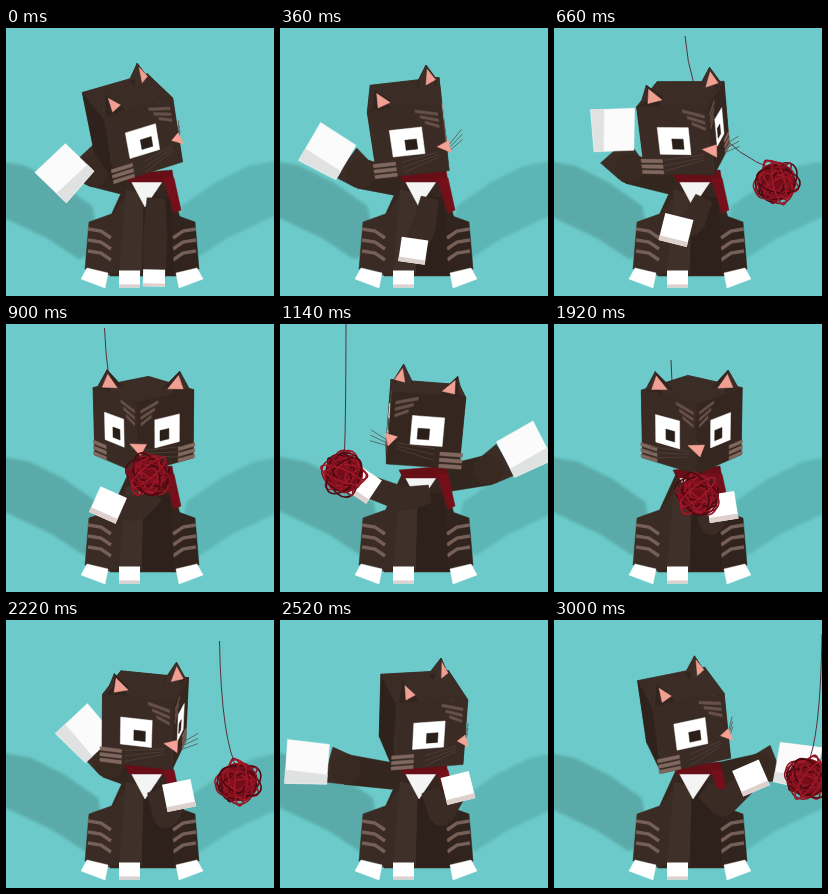
These frames come from a looping animation (268x268 px, 3060 ms). An HTML page:

```html
<!DOCTYPE html>
<html lang="en">
<head>
<meta charset="utf-8">
<title>Cat and yarn</title>
<style>
html, body { margin: 0; height: 100%; overflow: hidden; background: #6ccbca; }
svg { display: block; width: 100vw; height: 100vh; }
</style>
</head>
<body>
<svg id="stage" viewBox="0 0 268 268"></svg>
<script>
const LOOP = 3060, STEP = 60, MIDDLE = 136;
const HALF = 50, TALL = 71; // half diagonal and height of the head
const stage = document.getElementById('stage');
const rad = deg => deg * Math.PI / 180;
const mix = (a, b, p) => a + (b - a) * p;

// Every track holds one value per beat and eases between them.
const BEATS = [0, 660, 1140, 1440, 1920, 2520, 3000];
const YARN_BEATS = [540, ...BEATS.slice(1)];

function track(values, beats = BEATS) {
  return t => {
    let i = 0;
    while (i < beats.length - 2 && t > beats[i + 1]) i++;
    const p = Math.min(1, Math.max(0, (t - beats[i]) / (beats[i + 1] - beats[i])));
    return mix(values[i], values[i + 1], p * p * (3 - 2 * p));
  };
}
const gaze = track([60, 28, -41, -28, 5, 60, 56]);
const lean = track([-10, -6, 5, 4, 0, 3, -7]);
const tailSwing = track([-.72, -.87, .93, .05, 0, -1, .9]);
const tailAngle = track([226, 92, 27, 90, 90, 176, -10]);
const pawX = track([148, 122, 82, 122, 168, 178, 197]);
const pawY = track([250, 202, 160, 166, 183, 168, 158]);
const yarnX = track([320, 222, 64, 73, 144, 320, 253], YARN_BEATS);
const anchorX = track([320, 131, 66, 57, 117, 310, 268], YARN_BEATS);
const slack = track([10, 8, 0, 0, 36, 6, 14], YARN_BEATS);

const path = pts => 'M' + pts.map(p => p.map(v => v.toFixed(1)).join()).join('L');
const poly = (pts, fill) =>
  `<path d="${path(pts)}Z" fill="${fill}" stroke="${fill}" stroke-width=".5"/>`;
const line = (pts, color, width) =>
  `<path d="${path(pts)}" fill="none" stroke="${color}" stroke-width="${width}"/>`;
const dot = (x, y, r, fill) => `<circle cx="${x}" cy="${y}" r="${r}" fill="${fill}"/>`;
const mirror = (s, pts, shift = 0) => pts.map(([x, y]) => [MIDDLE + s * x + shift, y]);

// Tapered block along the segment a-b.
function limb(a, b, wa, wb, fill) {
  const dx = b[0] - a[0], dy = b[1] - a[1], len = Math.hypot(dx, dy) || 1;
  const nx = -dy / len / 2, ny = dx / len / 2;
  return poly([[a[0] + nx * wa, a[1] + ny * wa], [b[0] + nx * wb, b[1] + ny * wb],
    [b[0] - nx * wb, b[1] - ny * wb], [a[0] - nx * wa, a[1] - ny * wa]], fill);
}

function shadows(t) {
  const shape = [[145, 132], [112, 138], [78, 155], [45, 178], [36, 222],
    [58, 231], [90, 210], [145, 184]];
  return '<g filter="url(#soft)">' +
    poly(mirror(1, shape, lean(t) / 2), '#5cb6b5') +
    poly(mirror(-1, shape, lean(t) / 2), '#5aaaa9') + '</g>';
}

function tail(t) {
  const a = rad(tailAngle(t)), cos = Math.cos(a), sin = Math.sin(a);
  const root = [140, 160];
  const base = [140 + 92 * tailSwing(t), 146 - 23 * Math.abs(sin)];
  const knee = [mix(base[0], root[0], .2), mix(base[1], 153, .6)];
  const end = [base[0] + 42 * cos, base[1] - 42 * sin];
  const under = cos < 0 ? -1 : 1;
  const edge = ([x, y]) => [x + sin * under * 15, y + cos * under * 15];
  return limb(root, knee, 24, 30, '#33261f') + limb(knee, base, 30, 36, '#3b2c26') +
    dot(...knee, 15, '#382921') + limb(base, end, 40, 44, '#fbfbfb') +
    limb(edge(base), edge(end), 9, 13, '#e0e1e1');
}

const paw = (x, y, w, h, angle = 0) =>
  `<g transform="translate(${x} ${y}) rotate(${angle})">
    <rect x="${-w / 2}" y="${-h / 2}" width="${w}" height="${h}" fill="#fff"/>
    <rect x="${-w / 2}" y="${h * .32}" width="${w}" height="${h * .18}" fill="#ddd0cd"/></g>`;

function haunch(s) {
  let out = poly(mirror(s, [[12, 162], [28, 185], [53, 194], [57, 241], [33, 247], [20, 243]]),
    s < 0 ? '#3a2b25' : '#31231d');
  for (let y = 201; y < 230; y += 11)
    out += line(mirror(s, [[54, y], [41, y + 2], [31, y + 9]]), '#755f57', 3.4);
  return out + poly(mirror(s, [[34, 245], [55, 240], [61, 251], [37, 260]]), '#fff');
}

function body() {
  return poly([[122, 150], [164, 150], [174, 190], [176, 248], [104, 248], [106, 185]], '#35271f') +
    haunch(-1) + haunch(1) +
    poly([[120, 162], [138, 166], [136, 246], [113, 246]], '#3f3029') +
    poly([[138, 168], [164, 170], [168, 247], [136, 247]], '#2e211b') +
    paw(123.5, 251, 21, 17) +
    poly([[124, 151], [158, 151], [139, 179]], '#f4f4f4') +
    poly([[119, 146], [166, 142], [168, 154], [123, 154]], '#670e17') +
    poly([[157, 150], [168, 150], [175, 182], [168, 185]], '#75101b');
}

function arm(t) {
  const x = pawX(t), y = pawY(t), color = '#3a2b25';
  const elbow = [mix(150, x, .4), 209 - Math.abs(x - 150) / 2];
  const lift = Math.min(1, (250 - y) / 40);
  return limb([150, 170], elbow, 18, 24, color) + dot(...elbow, 11, color) +
    limb(elbow, [x, y], 24, 22, color) +
    paw(x, y, 22 + 7 * lift, 17 + 11 * lift, (150 - x) / 2);
}

function head(t) {
  const roll = rad(lean(t)), yaw = rad(gaze(t)), pitch = rad(18 + gaze(t) * .14);
  const cx = 138 + 1.2 * lean(t), cy = 99;
  const project = (x, y, z) => {
    const x1 = x * Math.cos(yaw) + z * Math.sin(yaw);
    const z1 = z * Math.cos(yaw) - x * Math.sin(yaw);
    const y1 = y * Math.cos(pitch) + z1 * Math.sin(pitch);
    const k = 1 + (z1 * Math.cos(pitch) - y * Math.sin(pitch)) / 900;
    return [cx + k * (x1 * Math.cos(roll) - y1 * Math.sin(roll)),
      cy + k * (x1 * Math.sin(roll) + y1 * Math.cos(roll))];
  };
  // u runs from the front edge outward, v from top to bottom.
  const on = (s, u, v, lift = 0) =>
    project(s * (HALF * u + lift), (v - .5) * TALL, HALF * (1 - u) + lift);
  const quad = (s, u0, u1, v0, v1, fill, slant = 0) =>
    poly([on(s, u0, v0 + slant), on(s, u1, v0), on(s, u1, v1), on(s, u0, v1 + slant)], fill);
  const top = (x, z, up = 0) => project(x * HALF, -TALL / 2 - up, z * HALF);
  const low = (x, z) => top(x, z, -TALL);

  const back = s => poly([top(s, 0), top(0, -1), low(0, -1), low(s, 0)], '#2f221c');
  const whiskers = s => [0, 1, 2].map(i =>
    line([on(s, .12, .69 + i * .04, 1), on(s, .62, .68 + i * .08, 12)], '#55443f', .7)).join('');
  const ear = s => {
    const tip = top(s * .72, -.04, 18);
    const base = [[.92, 0], [.6, .28], [.38, 0], [.62, -.24]].map(([x, z]) => top(s * x, z));
    return base.map((p, i) => poly([p, base[(i + 1) % 4], tip], i % 2 ? '#3d2e28' : '#32251f')).join('') +
      poly([top(s * .8, .1, 2), top(s * .5, .12, 2), top(s * .7, 0, 14)], '#f0a093');
  };
  const side = s => {
    let out = quad(s, 0, 1, 0, 1, s < 0 ? '#3a2b25' : '#35271f') +
      quad(s, .3, .74, .3, .7, '#fff') + quad(s, .39, .55, .47, .62, '#2a1e19');
    for (let i = 0; i < 3; i++) {
      const brow = .04 + i * .09, cheek = .78 + i * .085;
      out += quad(s, .06, .36 - i * .06, brow, brow + .04, '#665149', .08) +
        quad(s, .72, 1.03, cheek, cheek + .05, '#80685f');
    }
    return out;
  };
  const far = yaw > 0 ? 1 : -1;
  return whiskers(far) + back(far) + back(-far) + side(far) +
    poly([top(0, 1), top(1, 0), top(0, -1), top(-1, 0)], '#3b2d26') +
    side(-far) + ear(far) + ear(-far) +
    poly([on(-1, .12, .6, 2), on(1, .12, .6, 2), on(1, 0, .73, 3)], '#f5a196') +
    whiskers(-far);
}

const yarnY = t => 149 + slack(t) * .62;

function string(t) {
  const x = yarnX(t), y = yarnY(t), ax = anchorX(t);
  return `<path d="M${ax},${slack(t)}Q${mix(ax, x, .1)},${y * .75} ${x},${y - 12}"
    fill="none" stroke="#59313a"/>`;
}

function ball(t) {
  const x = yarnX(t);
  let out = dot(0, 0, 19, '#740d19');
  for (let i = 0; i < 17; i++) {
    const wobble = Math.sin(i * 12.9), color = ['#a01827', '#851220', '#4f0910'][i % 3];
    out += `<ellipse cx="${wobble * 2}" cy="${Math.cos(i * 5) * 3}" rx="${17 + 5 * Math.abs(wobble)}"
      ry="${5 + i * 7 % 13}" transform="rotate(${i * 67})" fill="none" stroke="${color}" stroke-width="1.6"/>`;
  }
  return `<g transform="translate(${x} ${yarnY(t)}) rotate(${x * 1.5})">${out}</g>`;
}

const defs = '<defs><filter id="soft"><feGaussianBlur stdDeviation="1.5"/></filter></defs>';
const start = performance.now();

function draw() {
  const t = Math.floor((performance.now() - start) % LOOP / STEP) * STEP;
  stage.innerHTML = defs + '<rect width="268" height="268" fill="#6ccbca"/>' +
    shadows(t) + tail(t) + string(t) + body() + arm(t) + head(t) + ball(t);
  requestAnimationFrame(draw);
}
draw();
</script>
</body>
</html>
```
